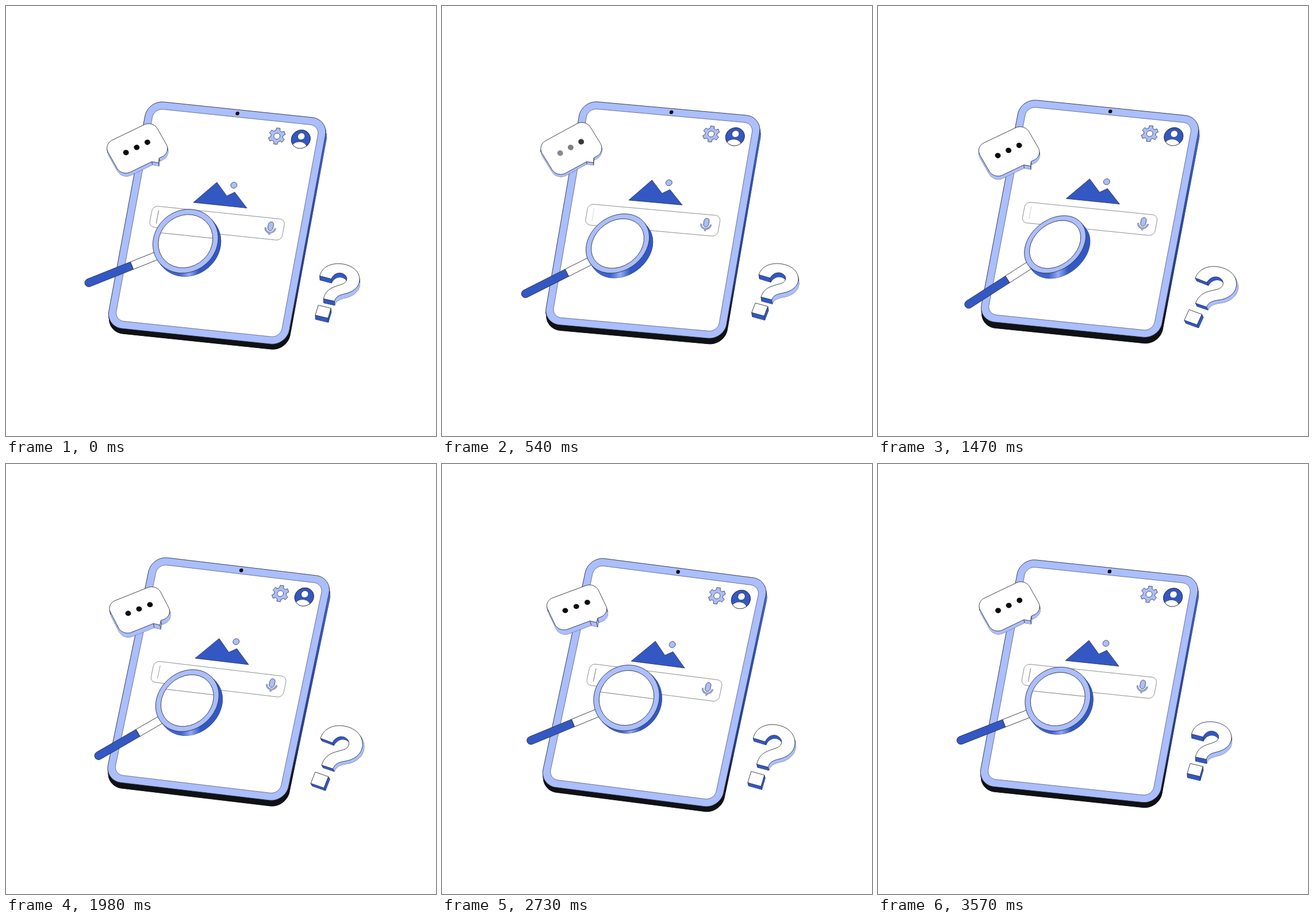
An HTML page for the animation above (3600 ms loop, 748 px wide and 748 px high).

```html
<!DOCTYPE html>
<html lang="en">
<head>
<meta charset="utf-8">
<title>Tablet search</title>
<style>
  html, body { margin: 0; width: 100%; height: 100%; overflow: hidden; background: #fff; }
  svg { display: block; width: 100vw; height: 100vh; }
  .thin * { vector-effect: non-scaling-stroke; }
</style>
</head>
<body>
<svg id="stage" viewBox="0 0 748 748">
  <defs>
    <linearGradient id="edge" x1="0" y1="0" x2="0" y2="1">
      <stop offset="0" stop-color="#4a6dd4"/>
      <stop offset=".25" stop-color="#3358c4"/>
      <stop offset=".7" stop-color="#26418f"/>
      <stop offset=".87" stop-color="#101114"/>
    </linearGradient>
    <linearGradient id="rim">
      <stop offset="0" stop-color="#4468d2"/>
      <stop offset=".32" stop-color="#3f62cc"/>
      <stop offset=".48" stop-color="#93abf4"/>
      <stop offset=".64" stop-color="#3358c4"/>
      <stop offset="1" stop-color="#3358c4"/>
    </linearGradient>
    <clipPath id="badge"><circle r="16.3"/></clipPath>
    <clipPath id="glass"><circle r="49.3"/></clipPath>
  </defs>
</svg>
<script>
const LOOP = 3600, LIGHT = '#abbefd', DARK = '#3358c4', INK = '#2c2f38', GRAY = '#6d7079';
const stage = document.getElementById('stage');

function add(parent, tag, attrs = {}) {
  const el = document.createElementNS('http://www.w3.org/2000/svg', tag);
  for (const k in attrs) el.setAttribute(k, attrs[k]);
  parent.appendChild(el);
  return el;
}
const set = (el, k, v) => el.setAttribute(k, v);
const clamp = v => Math.max(0, Math.min(1, v));
const smooth = v => { v = clamp(v); return v * v * (3 - 2 * v); };

// Samples a path made of M, L and C commands.
function trace(d) {
  const out = [];
  for (const [, cmd, rest] of d.matchAll(/([MLC])([^MLC]*)/g)) {
    const n = rest.trim().split(/[\s,]+/).map(Number);
    if (cmd !== 'C') { out.push([n[0], n[1]]); continue; }
    const p = out[out.length - 1];
    for (let i = 1; i <= 14; i++) {
      const t = i / 14, u = 1 - t;
      out.push([0, 1].map(k => u * u * u * p[k] + 3 * u * u * t * n[k] +
        3 * u * t * t * n[k + 2] + t * t * t * n[k + 4]));
    }
  }
  return out;
}

function roundRect(x, y, w, h, r, tail = '') {
  const k = r * 0.45, X = x + w, Y = y + h;
  return `M${x + r} ${y}L${X - r} ${y}C${X - k} ${y} ${X} ${y + k} ${X} ${y + r}` +
    `L${X} ${Y - r}C${X} ${Y - k} ${X - k} ${Y} ${X - r} ${Y}${tail}` +
    `L${x + r} ${Y}C${x + k} ${Y} ${x} ${Y - k} ${x} ${Y - r}` +
    `L${x} ${y + r}C${x} ${y + k} ${x + k} ${y} ${x + r} ${y}`;
}
function disc(r) {
  return Array.from({ length: 90 }, (_, i) => {
    const a = i * Math.PI / 45;
    return [r * Math.cos(a), r * Math.sin(a)];
  });
}

const poly = pts => 'M' + pts.map(p => p[0].toFixed(2) + ' ' + p[1].toFixed(2)).join('L') + 'Z';
const map = (m, [x, y]) => [m[0] * x + m[2] * y + m[4], m[1] * x + m[3] * y + m[5]];

// A flat outline with a thickness; tint(localPoint) picks a side colour.
class Solid {
  constructor(parent, pts, face, colors, tint = () => 0) {
    this.pts = pts;
    this.tint = tint;
    const g = add(parent, 'g', { 'stroke-linejoin': 'round' });
    this.back = add(g, 'path', { fill: colors[0], stroke: INK, 'stroke-width': 1 });
    this.sides = colors.map(c => add(g, 'path', { fill: c, stroke: c, 'stroke-width': .5 }));
    this.edges = add(g, 'path', { fill: 'none', stroke: INK, 'stroke-width': .9 });
    this.face = add(g, 'path', { fill: face, stroke: INK, 'stroke-width': .9 });
  }
  draw(m, [dx, dy]) {
    const p = this.pts.map(q => map(m, q)), n = p.length;
    const shift = q => [q[0] + dx, q[1] + dy];
    let area = 0;
    p.forEach((q, i) => { const r = p[(i + 1) % n]; area += q[0] * r[1] - r[0] * q[1]; });
    const sign = Math.sign(area), d = this.sides.map(() => '');
    const walls = p.map((q, i) => {
      const r = p[(i + 1) % n], ex = r[0] - q[0], ey = r[1] - q[1], len = Math.hypot(ex, ey);
      if (len < .01) return null;
      const nx = sign * ey / len, ny = -sign * ex / len;
      const seen = nx * dx + ny * dy > 0;
      if (seen) d[this.tint(this.pts[i])] += poly([q, r, shift(r), shift(q)]);
      return { q, nx, ny, seen };
    }).filter(Boolean);
    let lines = '';
    walls.forEach((w, i) => {
      const v = walls[(i + walls.length - 1) % walls.length];
      const sharp = w.nx * v.nx + w.ny * v.ny < .85;
      if (w.seen !== v.seen || (sharp && w.seen)) lines += `M${w.q}L${shift(w.q)}`;
    });
    set(this.back, 'd', poly(p.map(shift)));
    this.sides.forEach((s, i) => set(s, 'd', d[i]));
    set(this.edges, 'd', lines);
    set(this.face, 'd', poly(p));
  }
}

// Tablet
const tablet = new Solid(stage, trace(roundRect(0, 0, 316, 403, 28)), LIGHT, ['url(#edge)']);
const screen = add(stage, 'g', { class: 'thin', stroke: INK, 'stroke-width': .8, 'stroke-linejoin': 'round' });
add(screen, 'path', { d: roundRect(13, 13, 290, 377, 16), fill: '#fff', stroke: '#555a6b' });
add(screen, 'circle', { cx: 158, cy: 6.6, r: 3.3, fill: '#0b0b0d', stroke: 'none' });

const gear = [];
for (let i = 0; i < 6; i++) {
  for (const [off, r] of [[-.34, 10.6], [-.22, 14.6], [.22, 14.6], [.34, 10.6]]) {
    const a = i * Math.PI / 3 + off - Math.PI / 2;
    gear.push([233 + r * Math.cos(a), 39 + r * Math.sin(a)]);
  }
}
add(screen, 'path', { d: poly(gear), fill: LIGHT });
add(screen, 'circle', { cx: 233, cy: 39, r: 5.3, fill: '#fff' });

const user = add(screen, 'g', { transform: 'translate(275 40)' });
add(user, 'circle', { r: 16.3, fill: DARK });
add(user, 'ellipse', { cy: 14.5, rx: 13, ry: 10, fill: '#fff', 'clip-path': 'url(#badge)' });
add(user, 'circle', { cy: -5, r: 6.2, fill: '#fff' });
add(user, 'circle', { r: 16.3, fill: 'none' });

add(screen, 'path', { d: 'M110.6 170L144.6 130.5L166 152.5L178.4 144.5L204.3 170Z', fill: DARK });
add(screen, 'circle', { cx: 174.7, cy: 132.5, r: 5.4, fill: LIGHT });
add(screen, 'path', { d: roundRect(42, 183, 232, 37.5, 9.5), fill: '#fff', stroke: GRAY });
const cursor = add(screen, 'path', { d: 'M53.5 190V213.5', stroke: '#4a4d57' });

const mic = add(screen, 'g', { transform: 'translate(251 201.2)', fill: 'none' });
const stand = 'M-8.5 -1A8.5 8.5 0 0 0 8.5 -1M0 7.5V11.5';
add(mic, 'path', { d: stand, stroke: '#59607a', 'stroke-width': 3 });
add(mic, 'path', { d: stand, stroke: LIGHT, 'stroke-width': 1.5 });
add(mic, 'rect', { x: -4.5, y: -11.5, width: 9, height: 15.5, rx: 4.5, fill: LIGHT });

// Magnifier
const handle = add(stage, 'g', { stroke: INK, 'stroke-width': .9 });
const stick = add(handle, 'path', { fill: '#fff' });
const grip = add(handle, 'path', { fill: DARK });
const ring = new Solid(stage, disc(59), LIGHT, ['url(#rim)']);
const lens = add(stage, 'g', { class: 'thin', 'stroke-width': .9 });
add(lens, 'circle', { r: 49.3, fill: '#fff', stroke: INK });
const seen = add(add(lens, 'g', { 'clip-path': 'url(#glass)' }), 'path', { fill: 'none', stroke: GRAY });

// Speech bubble
const bubble = new Solid(stage, trace(roundRect(-47, -32.5, 94, 65, 16.5, 'L24.5 32.5L19.6 39.5L10.6 32.5')),
  '#fff', [LIGHT]);
const chat = add(stage, 'g', { fill: '#0b0b0d' });
const dots = [-20.4, 0, 20.4].map(x => add(chat, 'circle', { cx: x, cy: -2, r: 4.8 }));

// Question mark, laid out around (544, 495)
const hook = 'M545 470L565 475C569 466 578 463 585 466C594 470 594 479 586 483' +
  'C575 488 556 489 552 509L571 513C573 504 582 502 590 500C606 496 615 486 614 474' +
  'C612 457 594 449 577 449C560 449 548 457 545 470';
const center = pts => pts.map(([x, y]) => [x - 544, y - 495]);
const mark = new Solid(stage, center(trace(hook)), '#fff', [DARK, LIGHT],
  ([x, y]) => x + y > 36 ? 1 : 0);
const point = new Solid(stage, center(trace('M543 520L565 525L560 542L538 537')), '#fff', [DARK]);

// Bar with an optional round cap at the start
function bar([ax, ay], [bx, by], w, cap) {
  const l = Math.hypot(bx - ax, by - ay), x = -(by - ay) / l * w, y = (bx - ax) / l * w;
  return `M${bx + x} ${by + y}L${ax + x} ${ay + y}` +
    (cap ? `A${w} ${w} 0 0 1 ${ax - x} ${ay - y}` : `L${ax - x} ${ay - y}`) + `L${bx - x} ${by - y}Z`;
}
const mix = (a, b, k) => [a[0] + (b[0] - a[0]) * k, a[1] + (b[1] - a[1]) * k];

function render(t) {
  const th = t / LOOP * 2 * Math.PI, c = Math.cos(th), s = Math.sin(th);
  const sway = (m, a = 0, b = 0, e = 0) => m + a * c + b * s + e * Math.cos(2 * th);

  const ex = [314 / 316, sway(34.2, -1.4, -6.2) / 316];
  const ey = [sway(-76, 3, 9.3) / 403, sway(391.5, 2.6, -6.3) / 403];
  const cam = [sway(405.1, -2.5, -5.7), sway(185.6, 1.3, -2)];
  const tm = [...ex, ...ey, cam[0] - 158 * ex[0] - 6.6 * ey[0], cam[1] - 158 * ex[1] - 6.6 * ey[1]];
  tablet.draw(tm, [1.2, sway(9.5, -.6, .7)]);
  set(screen, 'transform', `matrix(${tm})`);
  set(cursor, 'opacity', .6 + .4 * Math.cos(4 * th));

  const cap = [sway(152.3, -8.3, -2.8), sway(497.2, -15.8, 15.5)];
  const neck = [sway(263, -2.8, -5.4), sway(441.9, -6.7, 7.6)];
  set(stick, 'd', bar(mix(cap, neck, .645), mix(cap, neck, 1.04), 7, false));
  set(grip, 'd', bar(cap, mix(cap, neck, .645), 7, true));

  // Tilted disc: squeeze along the projected normal
  const nx = sway(.33, -.06, .08), ny = sway(.4, -.06, .15);
  const q = nx * nx + ny * ny, k = (1 - Math.sqrt(1 - q)) / q;
  const rm = [1 - k * nx * nx, -k * nx * ny, -k * nx * ny, 1 - k * ny * ny,
    sway(312.5, -.2, -8.5), sway(411, -1.9, 4)];
  ring.draw(rm, [nx * 17, ny * 17]);
  set(lens, 'transform', `matrix(${rm})`);
  const det = rm[0] * rm[3] - rm[1] * rm[2], y0 = sway(-14.3, 4.3, -9.6);
  const local = (x, y) => [(rm[3] * x - rm[2] * y) / det, (rm[0] * y - rm[1] * x) / det];
  set(seen, 'd', `M${local(-60, y0 - 60 * ex[1])}L${local(60, y0 + 60 * ex[1])}`);
  set(seen, 'opacity', clamp(1.2 + 3 * Math.cos(th - 5.1)));

  const bm = [sway(18.75, -.1, -.5) * 2.25 / 46, sway(-8.5, -.5, -1.4) * 2.25 / 46,
    sway(14.6, .4, 2.1) / 31, sway(26.5, 0, .5) / 31,
    sway(229.6, -1.3, -4.9), sway(250.1, -3.2, -.3, .8)];
  bubble.draw(bm, [sway(1, 0, -1), sway(6, -.6, -1.8)]);
  set(chat, 'transform', `matrix(${bm})`);
  dots.forEach((dot, i) => {
    const dip = smooth((t - 120 - i * 40) / 400) * smooth((1400 - i * 40 - t) / 400);
    set(dot, 'opacity', 1 - dip * [.52, .48, .2][i]);
  });

  const qm = [sway(1.035, -.03, -.02), sway(.055, -.05, .025), sway(-.085, .075, -.05),
    sway(1.09, -.07, -.075), sway(544.2, .3, 4.65), sway(499.9, -4.9, -6.15)];
  const qd = [sway(1.6, -1.1, .2), sway(6, 1.2, .6)];
  mark.draw(qm, qd);
  point.draw(qm, qd);
}

function tick() {
  render(performance.now() % LOOP);
  requestAnimationFrame(tick);
}
tick();
</script>
</body>
</html>
```
